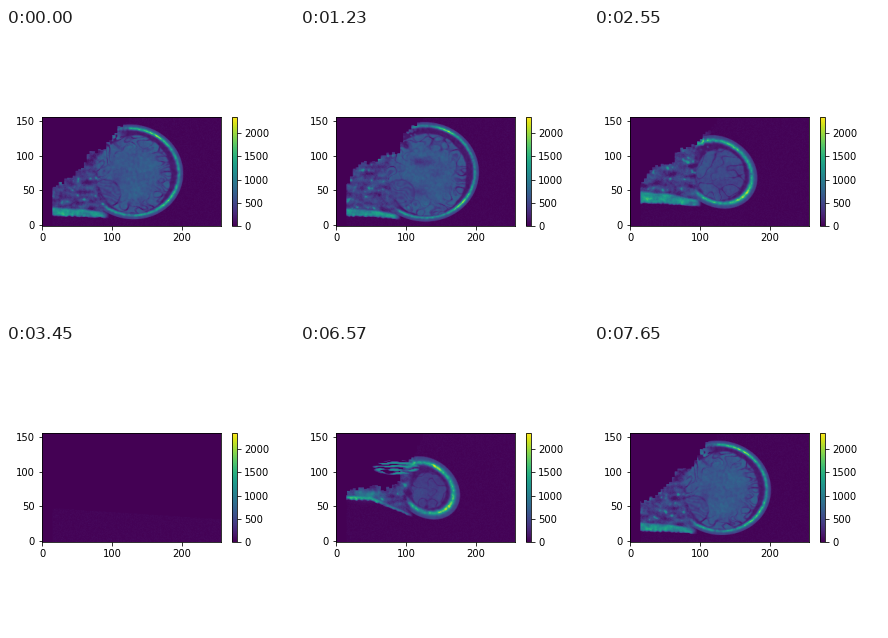
A matplotlib script for the animation above (7680 ms loop, 288 by 288 pixels).

```python
import numpy as np
import matplotlib.pyplot as plt
from matplotlib.animation import FuncAnimation

FRAMES, W, H, SIZE, VMAX = 256, 256, 156, 288, 2358
X, Y = np.meshgrid(np.arange(W), np.arange(H))

# Upper limit of the kept tissue along x, at a few slice positions.
CUT_X = [15, 28, 41, 60, 67, 90, 96, 110, 123]
CUT_S = [-37, 0, 41, 64]
CUT_Y = np.array([
    [68, 74, 78, 79, 74, 84, 108, 118, 150],
    [54, 61, 69, 86, 104, 109, 123, 140, 149],
    [57, 86, 89, 90, 101, 104, 130, 142, 149],
    [58, 78, 87, 87, 108, 114, 120, 134, 149],
])


class Waves:
    """Smooth 3D random field built from plane waves."""

    def __init__(self, seed, wavelength, count=70, stretch=1):
        rng = np.random.default_rng(seed)
        k = rng.normal(size=(3, count))
        k /= np.linalg.norm(k, axis=0)
        k *= 2 * np.pi / (wavelength * rng.uniform(0.75, 1.35, count))
        self.ks = k[2]
        self.phase = rng.uniform(0, 2 * np.pi, count)
        self.ex = np.exp(1j * np.outer(k[0], np.arange(W)) / stretch)
        self.ey = np.exp(1j * np.outer(np.arange(H), k[1]))
        self.gain = np.sqrt(2 / count)

    def at(self, s):
        turn = np.exp(1j * (self.ks * s + self.phase))
        return ((self.ey * turn) @ self.ex).real * self.gain


folds, fine = Waves(3, 17), Waves(5, 6)
streaks, broad = Waves(8, 9, stretch=2.5), Waves(13, 34)


def ramp(v, width=1.0):
    return np.clip(v / width + 0.5, 0, 1)


def bump(v, width):
    return np.exp(-(v / width) ** 2)


def dome(s, half):
    return np.sqrt(max(0.0, 1 - ((s - 28) / half) ** 2))


def radius(cx, cy, rx, ry):
    return np.hypot((X - cx) / rx, (Y - cy) / ry)


def cut_line(s):
    ys = [np.interp(s, CUT_S, col) for col in CUT_Y.T]
    jag = np.random.default_rng(21).uniform(-3, 3, W)
    x = np.arange(W)
    block = x // 4
    line = np.interp(block * 4 + 2, CUT_X, ys)
    line += jag[(block * 7 + int(s) // 4 * 3) % W]
    line[x > 123] = H + 1
    if s < -50:
        line[x < 105] = -1
    return line


def brain(s, n, f, b, grain):
    kb = dome(s, 72)
    cx, cy = 131 - 0.03 * s, 73
    rho = radius(cx, cy, 57 * kb + 0.1, 60 * kb + 0.1)
    inside = ramp((1 - rho) * 60 * kb + 0.6 * n, 2.5)
    angle = np.arctan2(Y - cy, X - cx)
    rays = np.sin(17 * angle + 2.4 * n + s * 0.05)
    mid = min(1, 1.4 * bump(s - 18, 33))
    rim = ramp(rho - 0.74, 0.3)
    tone = 650 + 40 * b + 30 * f + 25 * n + 30 * grain
    tone -= 330 * bump(n, 0.24) * (0.9 * rim * mid
                                   + (1 - mid) * ramp(rho - 0.3, 0.6))
    tone -= 260 * ramp(rays - 0.6, 0.5) * rim * mid
    # Dark chamber in the middle slices
    tone -= 330 * bump(s - 40, 16) * bump(radius(120, 92, 17, 9), 0.8)
    # Cerebellum with its dark outline
    rc = radius(91, 46, 20, 19)
    here = bump(s - 18, 42) * kb
    leaves = 480 + 80 * np.sin(Y + 0.4 * X + 2 * n) + 30 * f
    mix = ramp(1 - rc, 0.15) * here
    tone = tone * (1 - mix) + leaves * mix
    tone -= 280 * bump(rc - 1.04, 0.08) * here
    return inside, np.maximum(tone * min(1, 0.35 + 0.75 * kb), 130)


def noise_zone(s):
    tilt = 0.066 * (X - 15)
    upper = Y < 48 - tilt - 5.4 * (s - 115)
    lower = Y > 147 - tilt - 5.4 * (s + 65)
    return upper & lower & (X >= 15)


def section(i):
    if 115 < i < 191:
        i = 115
    s = i if i < 150 else i - FRAMES
    rng = np.random.default_rng(i)
    grain = rng.normal(size=(H, W))
    n, f, st, b = (w.at(s) for w in (folds, fine, streaks, broad))
    img = rng.rayleigh(22, (H, W))
    bars = np.zeros((H, W))
    k = dome(s, 82)

    if k > 0.05:
        cx, cy = 128 - 0.03 * s, 77
        # Small sections lean down towards the right
        skew = 0.55 * (1 - k) * (X - cx)
        rho = np.hypot((X - cx) / (78 * k), (Y - cy + skew) / (72 * k))
        depth = (1 - rho) * 75 * k * k
        angle = np.arctan2(Y - cy, X - cx)
        head = ramp(depth, 1)
        rear = ramp(X - cx + 40 * k, 10)

        # Skin, bright fat layer and dark bone
        fat = 1050 + 140 * b + 110 * f + 90 * grain + 700 * (1 - k)
        fat += 650 * bump(angle - 1.05, 0.3) + 650 * bump(angle + 0.7, 0.35)
        shell = 130 + 330 * ramp(4.5 - depth, 3) + 20 * f
        shell += (fat - 130) * bump(depth - 5.6, 2)
        img += head * rear * np.maximum(shell, 60)

        # Neck and face
        base = np.interp(s, [-45, -37, -15, 0, 41, 64, 85, 105],
                         [66, 60, 30, 14, 14, 21, 32, 60])
        floor = np.interp(X, [15, 50, 112],
                          [base, base - 1, cy - 72 * k + 1])
        fat_h = np.interp(s, [-37, 0, 41, 64, 90], [5, 12, 10, 18, 16])
        fat_h = fat_h * np.interp(X, [15, 60, 105], [1, 0.85, 0.45])
        up = Y - floor + 0.3 * f
        tissue = 390 + 90 * st + 50 * f + 60 * n + 45 * grain
        tissue += 400 * ramp(st + f - 2.8, 0.8)
        lard = 1150 + 130 * st + 60 * f + 60 * grain
        layer = ramp(up - 1, 3) * ramp(fat_h - up, 3)
        flesh = np.maximum(tissue, 90) * (1 - layer) + lard * layer
        ends = ramp(k - 0.3, 0.3)
        front = ramp(up, 1) * (X >= 15) * (1 - rear) * ends
        img += front * flesh

        # Bright fragments along the cut
        sinus = bump(radius(104, 120, 11, 17), 0.9) * ramp(k - 0.7, 0.3)
        img += sinus * 900 * ramp(f + n - 0.6, 0.8)
        side = bump(s + 37, 12)
        img += side * bump(radius(46, 67, 20, 7), 1) * 500
        stripes = ramp(np.sin(Y * 1.3 + n) + 0.6 * st - 0.4, 0.6)
        zone = ramp(1 - radius(86, 106, 32, 10), 0.2)
        bars = side * zone * 1200 * stripes

        inside, tone = brain(s, n, f, b, grain)
        img = img * (1 - inside) + tone * inside
    elif s < 0:
        img += 750 * bump(np.hypot(X - 114, Y - 141), 2.2) * bump(s + 65, 3)

    keep = noise_zone(s) & (Y < cut_line(s))
    return np.clip(np.maximum(np.where(keep, img, 0), bars), 0, VMAX)


def box(left, top, right, bottom):
    return [left / SIZE, 1 - bottom / SIZE,
            (right - left) / SIZE, (bottom - top) / SIZE]


fig = plt.figure(figsize=(4, 4), dpi=72)
ax = fig.add_axes(box(36, 88.87, 214.56, 197.67))
cax = fig.add_axes(box(225.72, 88.87, 231.16, 197.67))
picture = ax.imshow(section(0), origin="lower", cmap="viridis",
                    vmin=0, vmax=VMAX, aspect="auto")
fig.colorbar(picture, cax=cax)


def update(i):
    picture.set_data(section(i))
    return [picture]


anim = FuncAnimation(fig, update, frames=FRAMES, interval=30,
                     repeat=True, repeat_delay=0)
plt.show()
```
